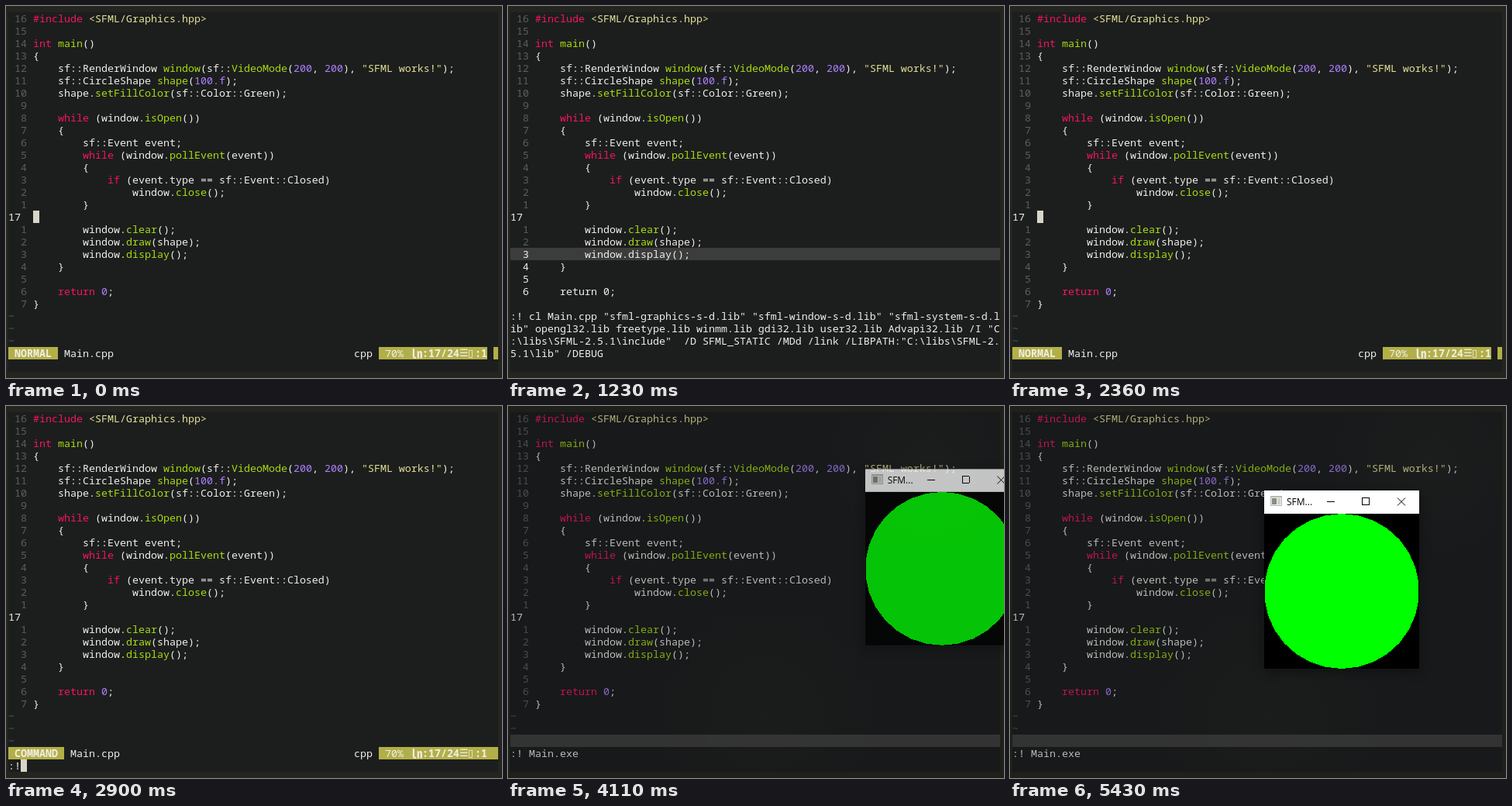
These frames come from a looping animation (640 px wide and 480 px high, 5.64 s). An HTML page:

```html
<!DOCTYPE html>
<html lang="en">
<head>
<meta charset="utf-8">
<title>Compile and run</title>
<style>
html, body { margin: 0; width: 100%; height: 100%; overflow: hidden; background: #24251f; }
#stage { position: relative; width: 640px; height: 480px; overflow: hidden; background: #24251f; isolation: isolate; }
#panel { position: absolute; left: 3px; top: 8px; width: 632px; height: 464px; background: #1c1e1e; }
#term { position: absolute; left: 3px; top: 8px; width: 632px; height: 464px; color: #efefe9;
  font: 13.3333px/16px "Noto Sans Mono", "DejaVu Sans Mono", monospace; font-variant-ligatures: none; }
#term div { position: relative; height: 16px; white-space: pre; overflow: hidden; }
.dim { background: #1f201a !important; }
.dim #panel { background: radial-gradient(circle at 540px 60px, #1c1d1d, transparent 130px),
  radial-gradient(circle at 330px 390px, #1b1d1c, transparent 150px), #17191a; }
.dim #term { opacity: .75; }
.bar { background: #3c3c3c; }
.key { color: #f6145f; }
.fn { color: #a6dc12; }
.num { color: #ae81ff; }
.str { color: #e6df94; }
.gut { color: #5a5d5e; }
.at, .fill, #cursor { position: absolute; top: 0; height: 16px; }
.fill { background: #b3af48; }
#cursor { width: 8px; background: #d9d6c8; }
.b { font-weight: 700; }
.cjk { font: 700 15px/15px "Noto Sans CJK JP", "Noto Sans CJK", sans-serif; }
.sym { font: 13px/16px "DejaVu Sans", sans-serif; }
#win { position: absolute; left: 0; top: 0; width: 200px; height: 230px; background: #000;
  box-shadow: 0 3px 14px rgba(0, 0, 0, .4), 0 0 1px #333; }
#win svg { display: block; }
#win text { font: 12px "Open Sans", "Noto Sans", sans-serif; }
#drag { position: absolute; left: 0; top: 0; width: 194px; height: 224px; border: 4px solid #fff; mix-blend-mode: difference; }
</style>
</head>
<body>
<div id="stage">
  <div id="panel"></div>
  <div id="term"></div>
  <div id="win">
    <svg width="200" height="230">
      <rect width="200" height="30" fill="#fff"/>
      <g shape-rendering="crispEdges">
        <rect x="8" y="7" width="15" height="13" fill="#b9b9b0"/>
        <rect x="9" y="9" width="13" height="10" fill="#eeeee8"/>
        <rect x="10" y="10" width="6" height="8" fill="#7f9183"/>
        <rect x="17" y="10" width="4" height="8" fill="#d2d2ca"/>
        <path d="M81 14.5h10M126.5 9.5h9v9h-9z" fill="none" stroke="#000"/>
      </g>
      <path d="M172 9.5l10 10m0-10l-10 10" fill="none" stroke="#000"/>
      <text x="29" y="19">SFM...</text>
      <polygon id="disc" fill="#0f0" shape-rendering="crispEdges"/>
    </svg>
  </div>
  <div id="drag"></div>
</div>
<script>
const $ = id => document.getElementById(id);
const LOOP = 5640, COLS = 79, ROWS = 29, CURRENT = 16;

const code = `#include <SFML/Graphics.hpp>

int main()
{
    sf::RenderWindow window(sf::VideoMode(200, 200), "SFML works!");
    sf::CircleShape shape(100.f);
    shape.setFillColor(sf::Color::Green);

    while (window.isOpen())
    {
        sf::Event event;
        while (window.pollEvent(event))
        {
            if (event.type == sf::Event::Closed)
                window.close();
        }

        window.clear();
        window.draw(shape);
        window.display();
    }

    return 0;
}`.split('\n');

const libs = ['sfml-graphics-s-d', 'sfml-window-s-d', 'sfml-system-s-d', 'opengl32', 'freetype',
  'winmm', 'gdi32', 'user32', 'Advapi32'].map(n => n + '.lib');
const build = ':! cl Main.cpp ' + libs.map((l, i) => i < 3 ? `"${l}"` : l).join(' ') +
  String.raw` /I "C:\libs\SFML-2.5.1\include"  /D SFML_STATIC /MDd /link /LIBPATH:"C:\libs\SFML-2.5.1\lib" /DEBUG`;
const run = ':! Main.exe';
const rights = 'Copyright (C) Microsoft Corporation.  All rights reserved.';

const esc = s => s.replace(/&/g, '&amp;').replace(/</g, '&lt;');
const span = (cls, s) => `<span class="${cls}">${esc(s)}</span>`;
const at = (x, s, cls = '') => `<span class="at ${cls}" style="left:${x - 3}px">${s}</span>`;
const fill = (from, to) => `<span class="fill" style="left:${from - 3}px;width:${to - from}px"></span>`;
const row = (html, cls = '') => `<div class="${cls}">${html}</div>`;
const text = s => row(esc(s));

const gutter = i => i === CURRENT ? '17  ' : String(Math.abs(i - CURRENT)).padStart(3) + ' ';
const plain = i => esc(gutter(i) + code[i]);

function paint(line) {
  const token = /(#include|\b(?:int|while|if|return)\b)|("[^"]*"|<[^>]*>)|(\b\d+(?:\.f)?)|(\w+(?=\())|[^]/g;
  return line.replace(token, (m, key, str, num, fn) =>
    key ? span('key', m) : str ? span('str', m) : num ? span('num', m) : fn ? span('fn', m) : esc(m));
}

function status(mode) {
  const end = 19 + mode.length * 8;
  return row(fill(3, end) + at(11, mode, 'b') + at(end + 8, 'Main.cpp') + at(449, 'cpp') +
    fill(481, mode === 'NORMAL' ? 621 : 629) + fill(629, 635) + at(489, '70%') + at(523, '㏑', 'cjk') +
    at(537, ':17/24', 'b') + at(585, '☰', 'sym') + at(596, '▯', 'sym') + at(605, ':1', 'b'));
}

function editor(mode = 'NORMAL', command = '') {
  const rows = code.map((l, i) => row(span(i === CURRENT ? '' : 'gut', gutter(i)) + paint(l)));
  for (let i = 0; i < 3; i++) rows.push(row(span('gut', '~')));
  return [...rows, status(mode), text(command)];
}

// Messages fill the bottom of the screen below a grey separator.
function messages(lines) {
  const sep = ROWS - lines.length - 1;
  return [...editor().slice(0, sep), row('', 'bar'), ...lines.map(text)];
}

// Separator already raised to row `sep`, old text not yet scrolled away.
function halfScrolled(lines, sep) {
  const rows = messages(lines), old = ROWS - lines.length - 1;
  for (let i = sep; i < old; i++) rows[i] = row(plain(i), i === sep ? 'bar' : '');
  rows[old] = row('');
  return rows;
}

const wrapped = build.match(new RegExp(`.{1,${COLS}}`, 'g'));
const sent = [...wrapped, ''];
const compiling = [...sent, 'Microsoft (R) C/C++ Optimizing Compiler Version 19.16.27030.1 for x86', rights, '', 'Main.cpp'];
const linked = [...compiling, 'Microsoft (R) Incremental Linker Version 14.16.27030.1', rights, '',
  '/out:Main.exe', String.raw`/LIBPATH:C:\libs\SFML-2.5.1\lib`, '/DEBUG', 'Main.obj', ...libs,
  'Press ENTER or type command to continue'];

// Start time, rows, cursor column and row
const scenes = [
  [0, editor(), 4, CURRENT],
  [280, editor('COMMAND', ':'), 1, 28],
  [550, messages(wrapped), wrapped[3].length, 28],
  [1230, halfScrolled(sent, 19)],
  [1300, messages(compiling)],
  [1830, halfScrolled(compiling, 2)],
  [1900, messages(linked), 39, 28],
  [2360, editor(), 4, CURRENT],
  [2630, editor('COMMAND', ':'), 1, 28],
  [2900, editor('COMMAND', ':!'), 2, 28],
  [3380, editor('COMMAND', ':! '), 3, 28],
  [3580, editor('COMMAND', run), run.length, 28],
  [3710, messages([run, ''])]
];

// Start time, x, y, scale, opacity
const winSteps = [
  [0, 460, 80, 1, 0], [4040, 460, 80, .95, .3], [4110, 460, 80, .99, .74], [4180, 460, 80, 1, .95],
  [4250, 460, 80, 1, 1], [5430, 328, 109, 1, 1]
];
const dragSteps = [[4950, 425, 76], [5020, 395, 83], [5090, 362, 93], [5160, 338, 102], [5230, 327, 108]];

const latest = (steps, t) => steps.filter(s => s[0] <= t).pop();

// The library draws its circle as a 30-sided polygon.
$('disc').setAttribute('points', Array.from({ length: 30 }, (_, i) => {
  const a = i * Math.PI / 15;
  return `${100 + 100 * Math.sin(a)},${130 - 100 * Math.cos(a)}`;
}).join(' '));

let shown;
function draw() {
  const t = performance.now() % LOOP;
  const scene = latest(scenes, t);
  if (scene !== shown) {
    const [, rows, col, line] = shown = scene;
    const cursor = line ? `<span id="cursor" style="left:${col * 8}px;top:${line * 16}px"></span>` : '';
    $('term').innerHTML = rows.join('') + cursor;
  }
  $('stage').classList.toggle('dim', t >= 4040);

  const [, x, y, scale, opacity] = latest(winSteps, t);
  $('win').style.transform = `translate(${x}px, ${y}px) scale(${scale})`;
  $('win').style.opacity = opacity;

  const drag = t < 5430 && latest(dragSteps, t);
  $('drag').style.display = drag ? 'block' : 'none';
  if (drag) $('drag').style.transform = `translate(${drag[1]}px, ${drag[2]}px)`;
  requestAnimationFrame(draw);
}
draw();
</script>
</body>
</html>
```
